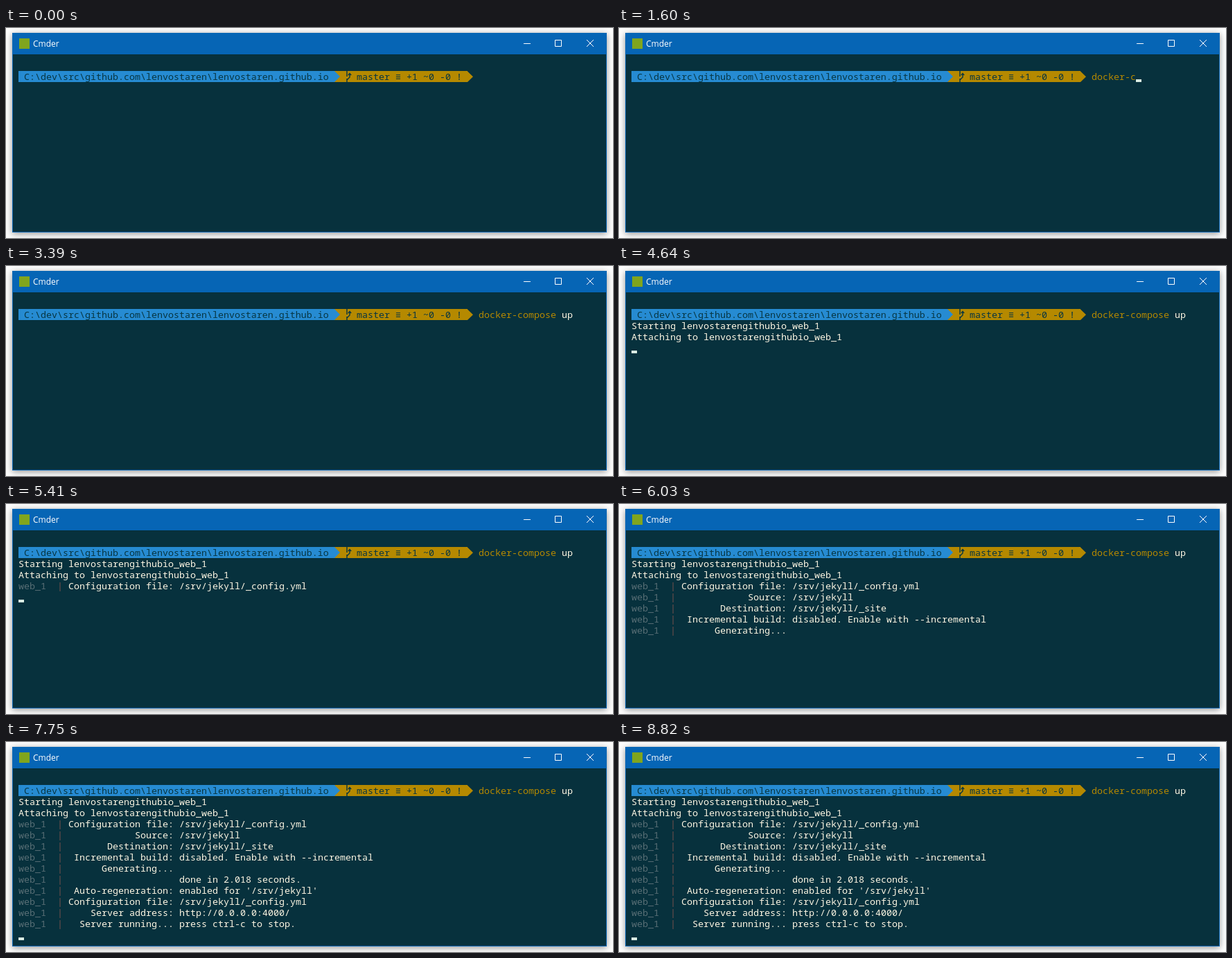
Animation, 876 px wide and 303 px high, one loop 9.22 s. Source, as an HTML page:

```html
<!DOCTYPE html>
<html lang="en">
<head>
<meta charset="utf-8">
<title>Terminal</title>
<style>
  html, body { margin: 0; width: 100%; height: 100%; overflow: hidden; background: #fdfdfd; }
  .window {
    position: absolute; left: 9px; top: 7px; width: 858px; height: 288px;
    background: #0a68b6; box-shadow: 0 2px 9px rgba(0, 0, 0, .42);
  }
  svg { position: absolute; left: 0; top: 0; display: block; }
  text { white-space: pre; }
  .mono { font: 13.3333px "Noto Sans Mono", "DejaVu Sans Mono", monospace; }
  .title { font: 12px "Open Sans", "Noto Sans", sans-serif; fill: #fff; }
</style>
</head>
<body>
<div class="window"></div>
<svg id="stage" width="876" height="303" viewBox="0 0 876 303">
  <rect x="10" y="8" width="856" height="30" fill="#0665b5"/>
  <rect x="10" y="38" width="856" height="256" fill="#07313d"/>
  <rect x="19" y="15" width="15" height="15" fill="#80a51e"/>
  <text class="title" x="39" y="27">Cmder</text>
  <path d="M747 22.5h10M792.5 17.5h9v9h-9zM838 17l10 10M848 17l-10 10" fill="none" stroke="#fff"/>
  <rect x="474" y="62" width="192" height="16" fill="#b58900"/>
  <path d="M18 62H474L482 70L474 78H18z" fill="#268bd2"/>
  <path id="tip" d="M666 62.5L674 70.2L666 78z"/>
  <path d="M492 62V70M492 73V78M492 75L496 71V66M493.8 68L496 65.6L498.2 68" fill="none" stroke="#073642" stroke-width="1.4"/>
</svg>
<script>
const LOOP = 9220, LEFT = 18, TOP = 62, CELL = 8, ROW = 16;
const INK = '#073642', CREAM = '#fdf6e3', GOLD = '#b58900', DIM = '#586e75',
      PIPE = '#79504c', GREEN = '#859900', RED = '#dc322f';
const user = 'lenvostaren';
const command = 'docker-compose';
const commandCol = 83;

const typeAt = [740, 820, 970, 1060, 1210, 1290, 1370, 1600, 1690, 1770,
                1930, 2160, 2390, 2470, 2540, 2620, 2780];
const enterAt = 2930;
const cursorOff = [[0, 570], [3390, 3970], [4490, 4640], [5180, 5410],
                   [6030, 6510], [7050, 7430], [8280, 8820]];
const containers = [
  [3970, 'Starting'],
  [4640, 'Attaching to']
];
const logs = [
  [5410, 'Configuration file:', '/srv/jekyll/_config.yml'],
  [5500, 'Source:', '/srv/jekyll'],
  [5500, 'Destination:', '/srv/jekyll/_site'],
  [5500, 'Incremental build:', 'disabled. Enable with --incremental'],
  [5500, 'Generating...', ''],
  [7430, '', 'done in 2.018 seconds.'],
  [7660, 'Auto-regeneration:', "enabled for '/srv/jekyll'"],
  [7750, 'Configuration file:', '/srv/jekyll/_config.yml'],
  [7750, 'Server address:', 'http://0.0.0.0:4000/'],
  [7750, 'Server running...', 'press ctrl-c to stop.']
];

const stage = document.getElementById('stage');
const tip = document.getElementById('tip');

function add(tag, attrs, parent = stage) {
  const el = document.createElementNS('http://www.w3.org/2000/svg', tag);
  for (const key in attrs) el.setAttribute(key, attrs[key]);
  return parent.appendChild(el);
}

function write(col, row, string, fill, parent) {
  const el = add('text', { class: 'mono', x: LEFT + col * CELL, y: TOP + 13 + row * ROW, fill }, parent);
  el.textContent = string;
  return el;
}

write(1, 0, `C:\\dev\\src\\github.com\\${user}\\${user}.github.io`, INK);
write(61, 0, 'master ≡ +1 ~0 -0 !', INK);
const commandText = write(commandCol, 0, '', GOLD);
const argText = write(commandCol + command.length + 1, 0, '', CREAM);

const output = [];
function addLine(time, draw) {
  const group = add('g');
  draw(group, output.length + 1);
  output.push({ time, group });
}
for (const [time, verb] of containers) {
  addLine(time, (g, row) => write(0, row, `${verb} ${user}githubio_web_1`, CREAM, g));
}
for (const [time, label, value] of logs) {
  addLine(time, (g, row) => {
    write(0, row, 'web_1', DIM, g);
    write(7, row, '|', PIPE, g);
    const start = 28 - label.length;
    if (label) write(start, row, label, CREAM, g);
    if (value) write(29, row, value, CREAM, g);
  });
}
const cursor = add('rect', { width: CELL, height: 4, fill: '#d9ebe2' });

function render(t) {
  const typed = typeAt.filter(at => at <= t).length;
  const shown = output.filter(line => line.time <= t).length;

  // "do" alone is an unfinished keyword, so the prompt flags an error.
  const keyword = typed === 2;
  commandText.textContent = command.slice(0, typed);
  commandText.setAttribute('fill', keyword ? GREEN : GOLD);
  tip.setAttribute('fill', keyword ? RED : GOLD);
  argText.textContent = 'up'.slice(0, Math.max(0, typed - command.length - 1));

  output.forEach((line, i) => line.group.setAttribute('visibility', i < shown ? 'visible' : 'hidden'));

  const entered = t >= enterAt;
  const col = entered ? 0 : commandCol + typed;
  const row = entered ? shown + 1 : 0;
  const hidden = cursorOff.some(([from, to]) => t >= from && t < to);
  cursor.setAttribute('x', LEFT + col * CELL);
  cursor.setAttribute('y', TOP + 12 + row * ROW);
  cursor.setAttribute('visibility', hidden ? 'hidden' : 'visible');
}

const begin = performance.now();
function tick() {
  render((performance.now() - begin) % LOOP);
  requestAnimationFrame(tick);
}
tick();
</script>
</body>
</html>
```
